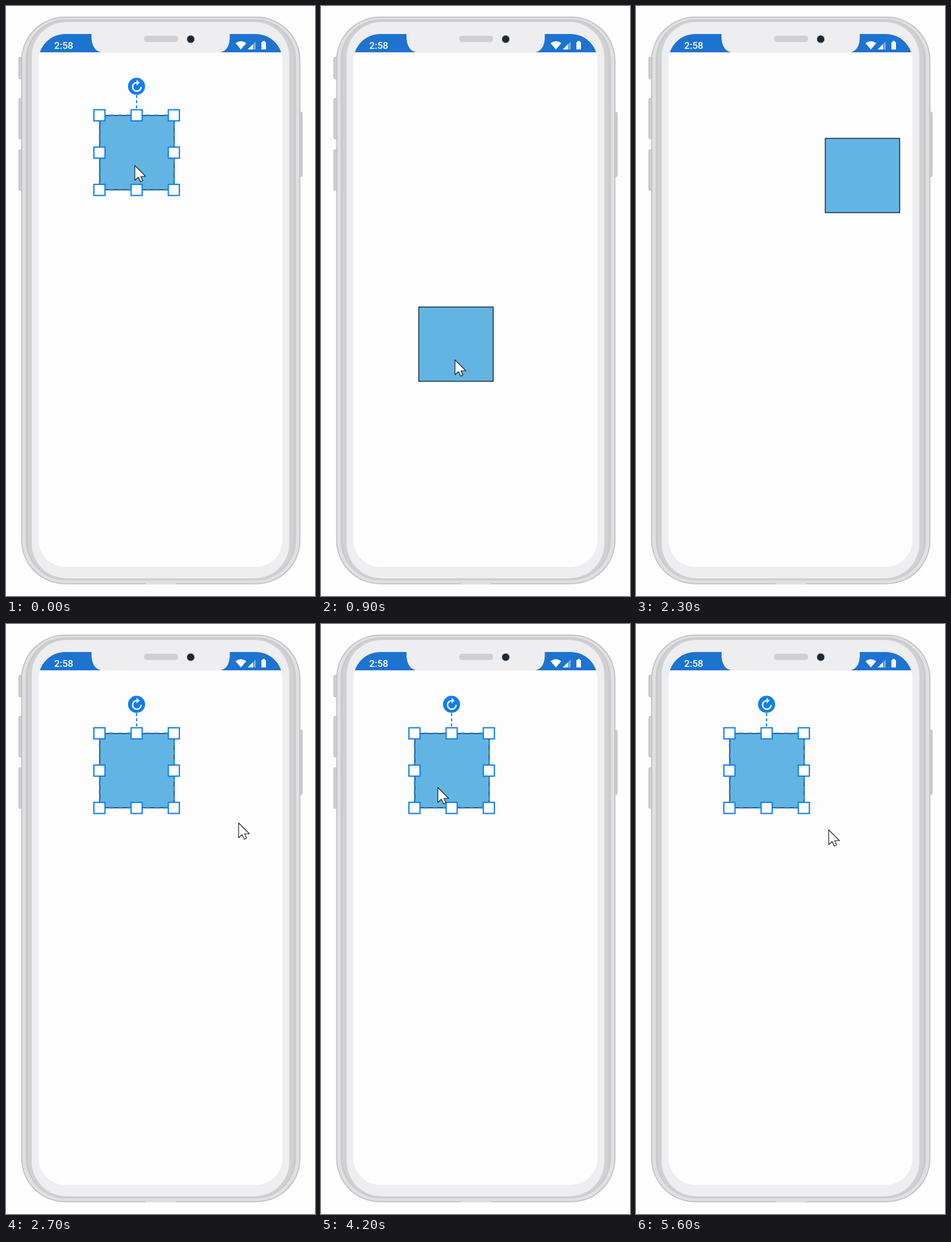
Write an HTML page that moves like this. It is 542x1032 px and loops after 5.7 s.

```html
<!DOCTYPE html>
<html lang="en">
<head>
<meta charset="utf-8">
<title>Drag and snap back</title>
<style>
html, body { margin: 0; width: 100%; height: 100%; overflow: hidden; background: #fefdfe; }
svg { display: block; width: 100%; height: 100%; }
text { font: 500 17px Roboto, sans-serif; fill: #fff; }
</style>
</head>
<body>
<svg viewBox="0 0 542 1032">
  <clipPath id="screen"><rect x="57" y="49" width="428" height="932" rx="47"/></clipPath>

  <g fill="#cfcfd1" stroke="#b4b4b7">
    <rect x="22.5" y="89.5" width="7" height="38" rx="2"/>
    <rect x="22.5" y="161.5" width="7" height="71" rx="2"/>
    <rect x="22.5" y="251.5" width="7" height="71" rx="2"/>
    <rect x="512.5" y="185.5" width="7" height="113" rx="2"/>
  </g>
  <rect x="27.5" y="19.5" width="488" height="991" rx="76" fill="#e0e0e2" stroke="#c2c2c4" stroke-width="2"/>
  <rect x="34.5" y="23.5" width="474" height="981" rx="70" fill="#c8cacb"/>
  <rect x="38" y="26" width="467" height="977" rx="67" fill="#d0d1d2"/>
  <rect x="45" y="28" width="452" height="973" rx="61" fill="#eeedef"/>
  <path d="M245 1010.5H298" stroke="#e6e6e8" stroke-width="2"/>

  <g clip-path="url(#screen)">
    <rect x="57" y="49" width="428" height="932" fill="#fefdfe"/>
    <rect x="57" y="49" width="428" height="32" fill="#1d73d0"/>
    <path d="M150 48V57Q152 80 170 81.5H373Q391 80 392.5 57V48Z" fill="#eeedef"/>
  </g>
  <rect x="242" y="52" width="60" height="11" rx="5.5" fill="#d0d0d2"/>
  <circle cx="324" cy="58" r="6.8" fill="#1c2935" stroke="#b9bdc2"/>
  <text x="84.5" y="75">2:58</text>
  <g fill="#fff">
    <path d="M402.5 65Q412 58 421.5 65L412 76Z"/>
    <path d="M438 62V76H424Z" opacity=".4"/>
    <path d="M433 67V76H424Z"/>
    <path d="M448 63H450V61H454V63H456V76H448Z"/>
  </g>

  <rect id="box" width="130.5" height="130" fill="#62b4e2" stroke="#10242f" stroke-width="1.5"/>
  <g id="grips" stroke="#0f7df2" stroke-width="2.2" fill="none">
    <rect x="164" y="191" width="131" height="130.500" stroke-width="2" stroke-dasharray="8 8"/>
    <path d="M229 156V181" stroke-width="2" stroke-dasharray="5 4"/>
    <circle cx="229" cy="140.500" r="15" fill="#0f7df2" stroke="none"/>
    <path d="M229.500 134A7.500 7.500 0 1 0 237 141.500" stroke="#fff" stroke-width="2.600"/>
    <path d="M229 129V139L234.500 134Z" fill="#fff" stroke="none"/>
  </g>
  <path id="cursor" d="M0 0V26L6 20.500L10 28.500L14 26.500L10.500 19H19Z" fill="#fff" stroke="#151515" stroke-width="1.2" stroke-linejoin="round"/>
</svg>
<script>
const LOOP = 5700, STEP = 100;
const HOME = { x: 164.5, y: 191.5 }, SIDE = 130.5;
const LEFT = 105.5, RIGHT = 332, EDGE = 485;
const [box, grips, cursor] = ['box', 'grips', 'cursor'].map(id => document.getElementById(id));

// Pointer stops: arrival, x, y, rest
const stops = [
  [0, 226, 279], [100, 228, 284], [600, 232, 454], [800, 236, 653], [900, 235, 619, 400],
  [1600, 232, 275], [2100, 500, 315, 400], [2700, 408, 348, 300], [3400, 235, 184],
  [4200, 205, 286], [4800, 69, 331], [5200, 205, 366], [5600, 338, 360]
];
// Press and release times
const drags = [[100, 1300], [1600, 2500], [4240, 5000]];

const clamp = (v, lo, hi) => Math.min(hi, Math.max(lo, v));
const show = (el, on) => el.setAttribute('visibility', on ? 'visible' : 'hidden');
const set = (el, attrs) => {
  for (const key in attrs) el.setAttribute(key, attrs[key]);
};

for (let i = 0; i < 9; i++) {
  if (i === 4) continue;
  const grip = document.createElementNS('http://www.w3.org/2000/svg', 'rect');
  set(grip, {
    x: HOME.x - 10.3 + (i % 3) * SIDE / 2, y: HOME.y - 10 + Math.floor(i / 3) * SIDE / 2,
    width: 19.4, height: 19.4, fill: '#fff'
  });
  grips.append(grip);
}

function pointerAt(t) {
  const i = stops.findLastIndex(s => s[0] <= t);
  const [t0, x0, y0, rest = 0] = stops[i];
  const [t1, x1, y1] = stops[i + 1] || [LOOP, x0, y0];
  const k = clamp((t - t0 - rest) / (t1 - t0 - rest), 0, 1);
  return { x: x0 + (x1 - x0) * k, y: y0 + (y1 - y0) * k };
}

function draw(t) {
  const p = pointerAt(t);
  const drag = drags.find(([press, release]) => t > press && t < release);
  const grab = drag ? pointerAt(drag[0]) : p;
  set(box, {
    x: clamp(HOME.x + p.x - grab.x, LEFT, RIGHT),
    y: HOME.y + p.y - grab.y
  });
  show(grips, !drag);
  show(cursor, p.x < EDGE);
  set(cursor, { transform: `translate(${p.x} ${p.y})` });
}

const start = performance.now();
function tick() {
  const t = (performance.now() - start) % LOOP;
  draw(Math.floor(t / STEP) * STEP);
  requestAnimationFrame(tick);
}
tick();
</script>
</body>
</html>
```
